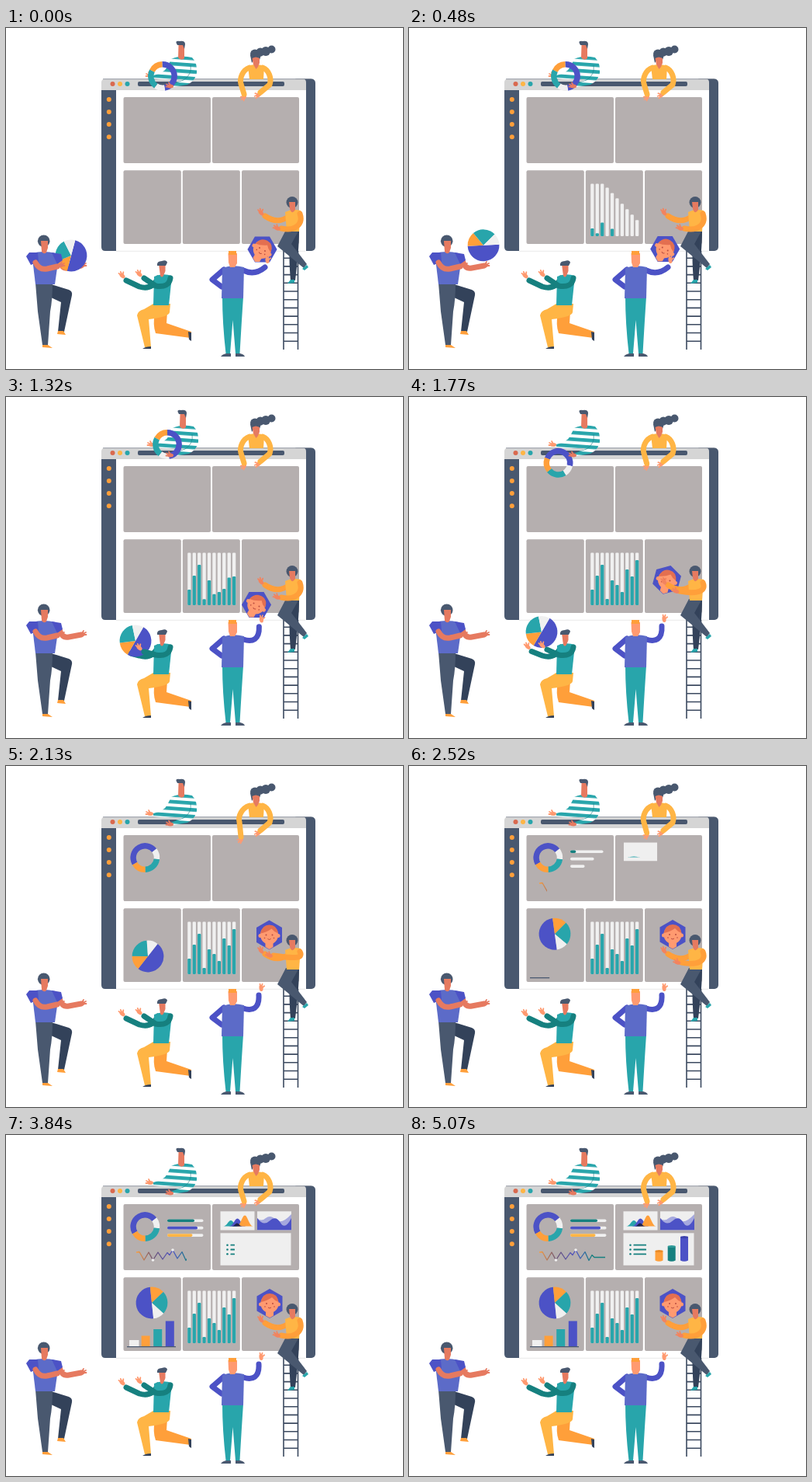
Animation, 512 px wide and 439 px high, one loop 5400 ms. Source, as an HTML page:

```html
<!DOCTYPE html>
<html lang="en">
<head>
<meta charset="utf-8">
<title>Team building a dashboard</title>
<style>
html, body { margin: 0; height: 100%; overflow: hidden; background: #fff; }
svg { display: block; width: 100%; height: 100%; }
.navy { fill: #49586f; } .ink { fill: #33425a; } .violet { fill: #4c52c6; } .lilac { fill: #5c6bc8; }
.teal { fill: #28a5ab; } .pine { fill: #16807f; } .orange { fill: #ff9f3a; } .yellow { fill: #ffb545; }
.skin { fill: #ff9a70; } .tan { fill: #e67a60; } .pale { fill: #f0f0f0; } .panel { fill: #b5afaf; }
.limb { fill: none; stroke-linecap: round; stroke-linejoin: round; stroke-width: 7; }
.pop { transform-box: fill-box; transform-origin: center; }
</style>
</head>
<body>
<svg viewBox="0 0 512 439">
<defs>
  <pattern id="stripes" width="10" height="8.6" patternUnits="userSpaceOnUse" patternTransform="translate(228 36) rotate(4)">
    <rect width="10" height="8.6" fill="#fff"/><rect width="10" height="4.6" class="teal"/>
  </pattern>
  <linearGradient id="ink" gradientUnits="userSpaceOnUse" x1="168" x2="253">
    <stop offset="0" stop-color="#ff9f3a"/><stop offset=".25" stop-color="#6a4f70"/>
    <stop offset=".55" stop-color="#4c52c6"/><stop offset=".8" stop-color="#16807f"/>
  </linearGradient>
  <clipPath id="lineClip"><rect id="lineReveal" x="166" y="140" height="30"/></clipPath>
  <clipPath id="waveClip"><rect id="waveReveal" x="324" y="98" height="24.5"/></clipPath>
  <g id="hand" stroke-width="1.8" stroke-linecap="round" fill="none">
    <ellipse rx="4" ry="2.5" fill="currentColor"/>
    <path d="M-2-1L-5-2.500M-2 .500L-5.500 .500M0-1L-2-4.500" stroke="currentColor"/>
  </g>
</defs>

<!-- window -->
<rect x="370" y="65.5" width="29" height="221.5" rx="5" class="navy"/>
<path d="M142 79H387V287H142Z" fill="#fff"/>
<path d="M142 287.3H386" stroke="#e4e4e4" stroke-width=".8"/>
<path d="M123 78H142V287H128Q123 287 123 282Z" class="navy"/>
<path d="M123 80V70Q123 65.5 128 65.5H383Q387 65.5 387 70V80Z" fill="#d5d5d5"/>
<path d="M125 65.7H394" stroke="#737c88" stroke-width=".7"/>
<circle cx="137.5" cy="72" r="3" fill="#d9694f"/><circle cx="147" cy="72" r="3" class="yellow"/><circle cx="156.5" cy="72" r="3" class="teal"/>
<rect x="170" y="69" width="189" height="6" rx="2" class="navy"/>
<g class="orange"><circle cx="132.8" cy="92" r="3"/><circle cx="132.8" cy="108" r="3"/><circle cx="132.8" cy="124" r="3"/><circle cx="132.8" cy="140.3" r="3"/></g>
<g class="panel">
  <rect x="151.5" y="89" width="112.5" height="85" rx="2"/><rect x="266" y="89" width="112" height="85" rx="2"/>
  <rect x="151.5" y="183.3" width="74.3" height="94.7" rx="2"/><rect x="227.8" y="183.3" width="74" height="94.7" rx="2"/><rect x="304" y="183.3" width="74" height="94.7" rx="2"/>
</g>

<!-- charts -->
<g id="bars"></g>
<g clip-path="url(#lineClip)">
  <path d="M168 151L172 150.500L178 161L184 151L189.500 161L196 151L202 160L208 151.500L211 154.500L215 148L221 159L227 150.500L232 161.500L236 154.500L239 157.500H253" fill="none" stroke="url(#ink)" stroke-width="1.300" stroke-linejoin="round"/>
  <circle cx="189.500" cy="161" r="1.800" class="pale"/><circle cx="215" cy="148" r="1.800" class="pale"/>
</g>
<rect id="card1" class="pop" x="276.500" y="98.300" width="44" height="24.200" fill="#efefef"/>
<path id="peak0" class="teal"/><path id="peak1" class="violet"/><path id="peak2" class="orange"/><path id="peak3" fill="#20234a"/>
<g clip-path="url(#waveClip)">
  <rect x="324" y="98.300" width="44" height="24.200" fill="#efefef"/>
  <path d="M324 107Q329 112 335 107T348 109T368 102V122.500H324Z" fill="#a5a8de"/>
  <path d="M324 107Q332 118 340 110.500T354 113T368 107V122.500H324Z" class="violet"/>
</g>
<rect id="card3" class="pop" x="276.500" y="126.300" width="91" height="41.500" fill="#efefef"/>
<path id="baseline" stroke="#49586f" stroke-width="1.300"/>

<!-- arms behind the thrown pieces -->
<path class="limb" d="M69 299Q72 311 81 309L97 306" stroke="#e67a60" stroke-width="6"/>
<use href="#hand" transform="translate(98 305.500) scale(-1 1)" color="#e67a60"/>
<path id="backArm" class="limb" stroke="#16807f"/><use id="backHand" href="#hand" color="#ff9a70"/>

<!-- man on the window -->
<g id="topMan">
  <path d="M213 40Q225 34 240 38Q247 45 246 58Q244 68 234 73L216 76L213 73L228 66H212Q204 67 190 65V61Q204 58 208 50Z" fill="url(#stripes)"/>
  <path d="M238 48Q240 60 229 67L214 72" fill="none" stroke="#167f85" stroke-width=".600"/>
  <path d="M222.500 22H230V39Q226 43 222 38Z" class="tan"/>
  <path d="M219.500 19Q219 16 224 17Q231 16 231 21L230 27L228 22L221 22Z" class="navy"/>
  <use href="#hand" transform="translate(186 61.500)" color="#ff9a70"/>
</g>
<g id="donut"></g><g id="hex">
  <path d="M0-19L16.500-9.500V9.500L0 19L-16.500 9.500V-9.500Z" class="violet"/>
  <path d="M-5 7H5V15.500L0 18.500L-5 15.500Z" class="skin"/><ellipse rx="11.500" ry="12" class="skin"/>
  <circle cx="-11.500" cy="1" r="2.500" class="skin"/><circle cx="11.500" cy="1" r="2.500" class="skin"/>
  <path d="M-11.500-2Q-9-13 0-13Q10-13 11.500-2Q6-4 3-8Q-4-3-11.500-2Z" fill="#e36f50"/>
  <g fill="#b94d40"><circle cx="-4" cy="0" r="1"/><circle cx="4" cy="0" r="1"/><circle cx="-6" cy="4" r=".800"/><circle cx="6" cy="4" r=".800"/></g>
  <path d="M-2 5Q0 7 2 5" fill="none" stroke="#b94d40"/>
</g>
<g id="pie"></g>
<use href="#hand" transform="translate(212 75)" color="#e67a60"/>

<!-- woman on the window -->
<g class="navy"><circle cx="321" cy="33.500" r="6"/><circle cx="328" cy="31" r="5.500"/><circle cx="335" cy="30" r="6"/><circle cx="342.500" cy="27.500" r="5"/><path d="M315 35H329L327 41Q322 36 317 45Z"/></g>
<path d="M312 49Q322 45 333 49L332 66H314Z" class="yellow"/>
<path d="M317.500 39Q322 36 327 39V45L325 50L322.500 53L319 47Z" class="tan"/>
<use id="womanHandL" href="#hand" color="#ff9a70"/><use id="womanHandR" href="#hand" color="#ff9a70"/>
<path id="womanArmL" class="limb" stroke="#ffb545" stroke-width="6"/><path id="womanArmR" class="limb" stroke="#ffb545" stroke-width="6"/>

<!-- man with the pie -->
<path d="M55 329L81 337Q86 339 85 344L75 391H67L71 353L56 346Z" class="ink"/>
<path d="M38 328H60Q60 350 57 365L54 408H47L41 365Z" class="navy"/>
<path d="M47 411V408H54L60 412ZM66 394L67 390H74L77 395Z" class="orange"/>
<path d="M34 290Q48 286 64 290L67 302L63 330H38L35 305Z" class="lilac"/>
<path d="M30 289L41 289L42 301L32 305L26 294ZM59 289L71 291L73 299L66 304Z" class="violet"/>
<circle cx="48.700" cy="274.300" r="7.800" class="navy"/>
<path d="M45 274H54V283L52 289Q49 292 46 288Z" class="tan"/>
<path class="limb" d="M38 302Q43 312 53 310L66 307" stroke="#e67a60" stroke-width="6"/>
<use href="#hand" transform="translate(70 305.500) scale(-1 1)" color="#e67a60"/>

<!-- kneeling man -->
<path d="M192 368L208 365L207 380L239 391L238 399L193 393Q189 382 192 368Z" class="orange"/>
<path d="M190 355H212L211 366Q210 372 184 375L187 411H179L169 370Q170 364 178 362Z" class="yellow"/>
<path d="M176 413Q180 410 187 410V413ZM235 391L239 392V403L236 401Z" class="ink"/>
<path d="M191 320Q202 315 214 319L210 357H190Z" class="teal"/>
<path d="M197 304H205.500V313L203 319Q201 322 199 319Z" class="tan"/>
<path d="M195 306Q194 300 201 300Q207 298 208 302L206 306Z" class="navy"/>
<path id="frontArm" class="limb" stroke="#16807f"/><use id="frontHand" href="#hand" color="#ff9a70"/>

<!-- standing man -->
<path d="M279 346H306Q304 375 301.500 419H296L292.500 376L289 419H283.500Q279 380 279 346Z" class="teal"/>
<path d="M277 423Q279 420 284 419H290V423ZM296 423V419H302Q307 420 308 423Z" class="navy"/>
<path class="limb" d="M281 311L266 324L278 333" stroke="#4c52c6"/>
<use id="lifterHand" href="#hand" color="#ff9a70"/>
<path id="lifter" class="limb" stroke="#4c52c6" stroke-width="8"/>
<path d="M279 309Q292 304 307 308L306 348H278Z" class="lilac"/>
<path d="M286.500 290H298V303L295 308H289L287 302Z" class="skin"/><path d="M287 287H297V292H287Z" class="orange"/>

<!-- ladder and climber -->
<path id="ladder" stroke="#3c4a60" stroke-width="1.600" fill="none"/>
<path d="M365 262H378Q378 285 373 325H367Q364 290 367 272Z" class="ink"/>
<path d="M361 260H378L368 278L388 304L384 309L350 281Z" class="navy"/>
<path d="M363 329L367 324H372V328ZM382 310L388 305L390 308L385 312Z" class="teal"/>
<path id="climbArmA" class="limb" stroke="#ff9f3a"/>
<path d="M360 237Q369 232 380 235L378 262H362Z" class="yellow"/>
<circle cx="369" cy="224.500" r="7.500" class="navy"/>
<path d="M365 224H373V234Q369 241 366 233Z" class="tan"/>
<path id="climbArmB" class="limb" stroke="#ff9f3a"/>
<use id="climbHandA" href="#hand" color="#f2845f"/><use id="climbHandB" href="#hand" color="#f2845f"/>
</svg>

<script>
const LOOP = 5400, STEP = 30, LAST = 5070;
const $ = id => document.getElementById(id);
const set = (id, attrs) => { for (const k in attrs) $(id).setAttribute(k, attrs[k]); };
const progress = (t, from, to) => Math.min(1, Math.max(0, (t - from) / (to - from)));
const smooth = x => x * x * (3 - 2 * x);
const bump = (t, a, b, c, d) => smooth(progress(t, a, b)) - smooth(progress(t, c, d));
const move = (id, x, y, r = 0) => set(id, { transform: `translate(${x} ${y}) rotate(${r})` });

// Monotone cubic through rows of [time, ...values].
function track(keys, t) {
  let i = 0;
  while (i < keys.length - 2 && t > keys[i + 1][0]) i++;
  const [a, b] = [keys[i], keys[i + 1]], dt = b[0] - a[0], u = progress(t, a[0], b[0]);
  return a.slice(1).map((v, n) => {
    const c = n + 1;
    const slope = j => keys[j] && keys[j + 1] ? (keys[j + 1][c] - keys[j][c]) / (keys[j + 1][0] - keys[j][0]) : 0;
    const tangent = j => { const p = slope(j - 1), q = slope(j); return p * q > 0 ? 2 * p * q / (p + q) : 0; };
    const s = smooth(u);
    return v * (1 - s) + b[c] * s + dt * (tangent(i) * u * (1 - u) ** 2 - tangent(i + 1) * u * u * (1 - u));
  });
}

const PIE = [[0, 84, 293, -75], [300, 83, 294, -62], [620, 112, 270, 60], [930, 142.5, 286, 165], [1140, 165, 312, 250],
  [1320, 167, 314, 300], [1650, 168, 313, 300], [1900, 176, 282, 302], [2130, 183, 245, 308], [2550, 188, 216, 444]];
const DONUT = [[0, 202, 62, -92], [930, 202, 62, -92], [1320, 208, 61, -90], [1500, 207, 61, -95], [1800, 191, 88, -165], [2070, 179.3, 118, -210]];
const HEX = [[0, 330.5, 285, 30], [930, 329.5, 283, 30], [1320, 323, 267.5, 30], [1700, 331, 240, 18], [2130, 339.5, 217.5, 0], [2300, 340, 217, 0]];

function ring(id, radius, width, parts) {
  let angle = 0;
  for (const [color, span] of parts) {
    $(id).innerHTML += `<circle r="${radius}" fill="none" stroke="${color}" stroke-width="${width}" pathLength="360"
      stroke-dasharray="${span} 360" transform="rotate(${angle})"/>`;
    angle += span;
  }
}
ring('pie', 10.2, 20.4, [['#4c52c6', 180], ['#ff9f3a', 53], ['#28a5ab', 85], ['#f0f0f0', 42]]);
ring('donut', 15.2, 7.4, [['#4c52c6', 172], ['#f0f0f0', 45], ['#28a5ab', 82], ['#ff9f3a', 61]]);

// Shapes that grow: [class, x, y, w, h, start, end, radius]
const columns = [20, 38, 52, 8, 32, 26, 17, 46, 37, 58];
const starts = [70, 400, 200, 515, 235, 865, 490, 940, 525, 790];
const upright = [], sideways = [];
columns.forEach((h, i) => {
  const x = 234.2 + i * 6.42;
  upright.push(['pale', x, 200.5, 4.3, 67.5, 60 + i * 35, 400 + i * 35, 1.2]);
  upright.push(['teal', x, 268 - h, 4.3, h, starts[i], starts[i] + 830, 1.2]);
});
[['pale', 8.5, 2500, 2950], ['orange', 14, 2600, 3000], ['teal', 22.5, 2780, 3300], ['violet', 33, 3350, 3810]]
  .forEach(([c, h, a, b], i) => upright.push([c, 159 + i * 15.6, 272.5 - h, i ? 11 : 12.5, h, a, b, 0]));
[['pine', 35, 2400, 2980], ['violet', 39, 2890, 3450], ['yellow', 32.5, 3350, 3830]].forEach(([c, w, a, b], i) => {
  const y = 108.4 + i * 9.4;
  sideways.push(['pale', 208, y, 46.5, 3.7, 2200 + i * 90, 2550 + i * 90, 1.8], [c, 208, y, w, 3.7, a, b, 1.8]);
});
const bullets = [0, 1, 2].map(i => 141.7 + i * 5.8);
for (const y of bullets) {
  sideways.push(['pine', 284.2, y - 1.3, 2.6, 2.6, 3650, 3750, 1.3], ['pine', 289.5, y - .9, 16.5, 1.8, 3660, 4200, .5]);
}
const cylinders = [['orange', '#e98a27', 317.5, 12, 4020, 4350], ['pine', '#2f9a98', 333.7, 18, 4250, 4650], ['violet', '#3d42ad', 350, 30, 4540, 5070]];

const grown = [...upright.map(s => [...s, true]), ...sideways.map(s => [...s, false])];
const rounded = ([c, , , , , , , r]) => `<rect class="${c}" rx="${r}"/>`;
$('bars').innerHTML = upright.map(rounded).join('');
$('card3').insertAdjacentHTML('afterend', '<g id="details">' + sideways.map(rounded).join('') +
  cylinders.map(([c, cap], i) => `<path id="cyl${i}" class="${c}"/><ellipse id="cap${i}" rx="5" ry="1.5" fill="${cap}"/>`).join('') + '</g>');
const rects = [...$('bars').children, ...$('details').querySelectorAll('rect')];

let ladder = 'M358 287V414M376.500 287V414';
for (let i = 0; i < 12; i++) ladder += `M358 ${285.5 + i * 10.7}H376.5`;
set('ladder', { d: ladder });

const bell = (x, w, h) => `M${x - w} 117.500C${x - w / 2} 117.500 ${x - w / 3} ${117.5 - h} ${x} ${117.5 - h}S${x + w / 2} 117.500 ${x + w} 117.500Z`;
const peaks = [[290, 10, 7.5], [298.5, 11, 10], [308, 11, 14], [298, 7, 4]];

function charts(t) {
  grown.forEach(([, x, y, w, h, a, b, , up], i) => {
    const k = progress(t, a, b), r = rects[i];
    r.setAttribute('x', x);
    r.setAttribute('y', up ? y + h * (1 - k) : y);
    r.setAttribute('width', up ? (k ? w : 0) : w * k);
    r.setAttribute('height', up ? h * k : h);
  });
  cylinders.forEach(([, , x, h, a, b], i) => {
    const k = progress(t, a, b), top = 161.5 - h * k, visibility = k ? 'visible' : 'hidden';
    set('cyl' + i, { d: `M${x} ${top}V161.500Q${x + 5} 164 ${x + 10} 161.500V${top}Z`, visibility });
    set('cap' + i, { cx: x + 5, cy: top, visibility });
  });
  set('lineReveal', { width: t > 2280 ? 2 + 85 * progress(t, 2280, 4320) : 0 });
  set('waveReveal', { width: 44 * smooth(progress(t, 3100, 3600)) });
  set('baseline', { d: `M156 272.700h${63 * progress(t, 2400, 2700)}` });
  $('card1').style.transform = `scale(${smooth(progress(t, 2200, 2550))})`;
  $('card3').style.transform = `scale(${smooth(progress(t, 3400, 3720))})`;
  peaks.forEach(([x, w, h], i) => {
    const k = smooth(progress(t, 2450 + i * 60, 2750 + i * 60));
    set('peak' + i, { d: k ? bell(x, w, h * k) : '' });
  });
}

function people(t) {
  move('topMan', 2 * bump(t, 930, 1260, 1400, 1800), 0);

  const left = bump(t, 1700, 2100, 2200, 2600), right = bump(t, 2600, 2940, 3040, 3420);
  const lx = 307 - 4 * left, ly = 86 + 6 * left, rx = 327 + 15 * right, ry = 84 + 8 * right;
  set('womanArmL', { d: `M314 51C${305 - left} 54 ${301 - 2 * left} 65 ${303 - 2 * left} 72L${lx} ${ly - 1}` });
  set('womanArmR', { d: `M331 51C339 54 ${343 + 4 * right} 65 ${340 + 7 * right} ${73 + 2 * right}L${rx + 1} ${ry - 1}` });
  move('womanHandL', lx + .5, ly + 2, -75);
  move('womanHandR', rx - 1, ry + 2, -45 * (1 + right));

  const hold = bump(t, 900, 1140, 1600, 1950);
  const bx = 155 + 6 * hold, by = 325 + 5 * hold, fx = 178, fy = 322 + 6 * hold;
  set('backArm', { d: `M196 322Q188 338 172 333L${bx} ${by}` });
  move('backHand', bx - 5, by - 6, 40);
  set('frontArm', { d: `M212 322Q210 335 193 332L${fx} ${fy}` });
  move('frontHand', fx - 6, fy - 5, 40);

  const lift = smooth(progress(t, 800, 1400));
  const hx = 337 - 8 * lift, hy = 299 - 13 * lift;
  set('lifter', { d: `M306 312C318 ${318 - 2 * lift} ${328 - lift} ${313 - lift} ${hx - 3} ${hy + 9}` });
  move('lifterHand', hx, hy, 80);

  const reach = bump(t, 1500, 2000, 2250, 2700);
  const bx2 = 355 - 10 * reach, by2 = 258 - 14 * reach;
  set('climbArmA', { d: 'M364 243Q350 253 334 242' });
  move('climbHandA', 329, 238, 50);
  set('climbArmB', { d: `M379 239C384 ${253 - 5 * reach} 372 ${262 - 14 * reach} ${bx2} ${by2}` });
  move('climbHandB', bx2 - 5, by2, 15);
}

function draw(now) {
  const t = Math.min(LAST, Math.floor(now % LOOP / STEP) * STEP);
  move('pie', ...track(PIE, t));
  move('donut', ...track(DONUT, t));
  move('hex', ...track(HEX, t));
  charts(t);
  people(t);
}

let begin;
function tick(now) {
  begin ??= now;
  draw(now - begin);
  requestAnimationFrame(tick);
}
draw(0);
requestAnimationFrame(tick);
</script>
</body>
</html>
```
